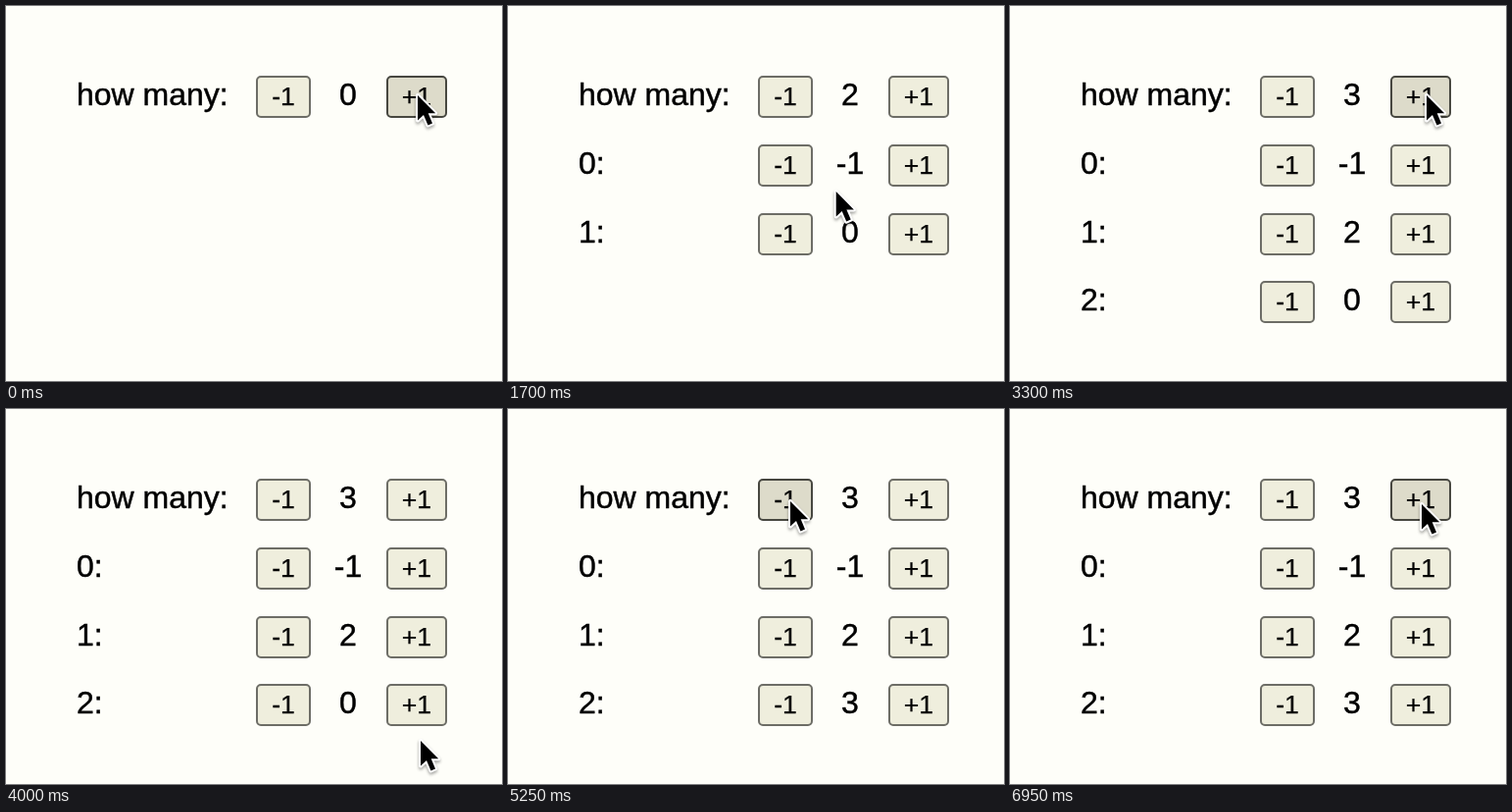
An HTML page that plays this animation: 506 px wide and 382 px high, repeating every 7 s.

```html
<!DOCTYPE html>
<html lang="en">
<head>
<meta charset="utf-8">
<title>Counters</title>
<style>
  html, body { margin: 0; width: 100%; height: 100%; overflow: hidden; background: #fefef9; }
  svg { display: block; width: 506px; height: 382px; }
  text { font: 32px "Liberation Sans", Arial, sans-serif; fill: #000; stroke: #000; stroke-width: .45; }
  .value { text-anchor: middle; }
  .button text { font-size: 26.67px; text-anchor: middle; stroke-width: .25; }
  .button rect { fill: #efeedd; stroke: #6d6d66; stroke-width: 2; }
  .button.hover rect { fill: #dddbca; stroke: #474740; }
  .button.active rect { fill: #f5f4e4; stroke: #8d8d84; }
  #cursor { filter: drop-shadow(0 2px 1.5px rgba(0, 0, 0, .35)); }
  #cursor path { fill: #000; stroke: #fff; stroke-width: 4; stroke-linejoin: round; paint-order: stroke; }
</style>
</head>
<body>
<svg viewBox="0 0 506 382">
  <g id="rows"></g>
  <g id="cursor"><path d="M0 0V25.5L6 20L10.5 30.5L15 28.5L10.7 18.3H18.2Z"/></g>
</svg>
<script>
const LOOP = 7000;
const PRESS = 100;
const LABELS = ["how many:", "0:", "1:", "2:"];
const SIDES = { "-1": { x: 255, w: 56 }, "+1": { x: 388, w: 62 } };

// Where the pointer rests; clicks are spread evenly over each stay
const STOPS = [
  { from: 0, to: 700, x: 420, y: 91, row: 0, step: 1, clicks: 2 },
  { from: 1000, to: 1000, x: 268, y: 204 },
  { from: 1200, to: 1500, x: 283, y: 163, row: 1, step: -1, clicks: 1 },
  { from: 1950, to: 2600, x: 406, y: 225, row: 2, step: 1, clicks: 2 },
  { from: 2900, to: 3600, x: 425, y: 91, row: 0, step: 1, clicks: 1 },
  { from: 4000, to: 4000, x: 423, y: 338 },
  { from: 4200, to: 4850, x: 421, y: 302, row: 3, step: 1, clicks: 3 },
  { from: 5200, to: 5950, x: 288, y: 94, row: 0, step: -1, clicks: 3 },
  { from: 6200, to: LOOP - 250, x: 420, y: 97, row: 0, step: 1, clicks: 3 }
];

const releases = STOPS.flatMap(({ from, to, row, step, clicks = 0 }) =>
  Array.from({ length: clicks }, (_, k) => ({
    row, step, time: from + (to - from) * (k + 1) / (clicks + 1)
  })));

function add(parent, tag, attrs, content = "") {
  const node = document.createElementNS("http://www.w3.org/2000/svg", tag);
  for (const key in attrs) node.setAttribute(key, attrs[key]);
  node.textContent = content;
  return parent.appendChild(node);
}

function makeButton(parent, sign, top) {
  const { x, w } = SIDES[sign];
  const node = add(parent, "g", {});
  add(node, "rect", { x: x + 1, y: top + 1, width: w - 2, height: 41, rx: 4 });
  add(node, "text", { x: x + w / 2, y: top + 30 }, sign);
  return { node, step: Number(sign), x, w, top };
}

const rows = LABELS.map((label, i) => {
  const top = Math.round(71 + 69.75 * i);
  const group = add(document.getElementById("rows"), "g", {});
  add(group, "text", { x: 72, y: top + 30 }, label);
  return {
    group,
    value: add(group, "text", { x: 349, y: top + 30, class: "value" }),
    buttons: Object.keys(SIDES).map(sign => makeButton(group, sign, top))
  };
});
const cursor = document.getElementById("cursor");

const ease = u => u * u * (3 - 2 * u);

function pointerAt(t) {
  const i = STOPS.findLastIndex(stop => stop.from <= t);
  const a = STOPS[i];
  const b = STOPS[i + 1];
  if (!b || t <= a.to) return [a.x, a.y];
  const u = ease((t - a.to) / (b.from - a.to));
  return [a.x + (b.x - a.x) * u, a.y + (b.y - a.y) * u];
}

function draw(t) {
  const [px, py] = pointerAt(t);
  const values = LABELS.map(() => 0);
  for (const r of releases) if (t >= r.time) values[r.row] += r.step;
  const pressed = releases.find(r => t < r.time && t >= r.time - PRESS);

  rows.forEach((row, i) => {
    row.group.setAttribute("visibility", i <= values[0] ? "visible" : "hidden");
    row.value.textContent = values[i];
    for (const b of row.buttons) {
      const hover = px >= b.x && px < b.x + b.w && py >= b.top && py < b.top + 43;
      const active = hover && pressed && pressed.row === i;
      b.node.setAttribute("class", "button" + (active ? " active" : hover ? " hover" : ""));
    }
  });
  cursor.setAttribute("transform", `translate(${px.toFixed(1)} ${py.toFixed(1)})`);
}

const start = performance.now();
function tick() {
  draw((performance.now() - start) % LOOP);
  requestAnimationFrame(tick);
}
tick();
</script>
</body>
</html>
```
